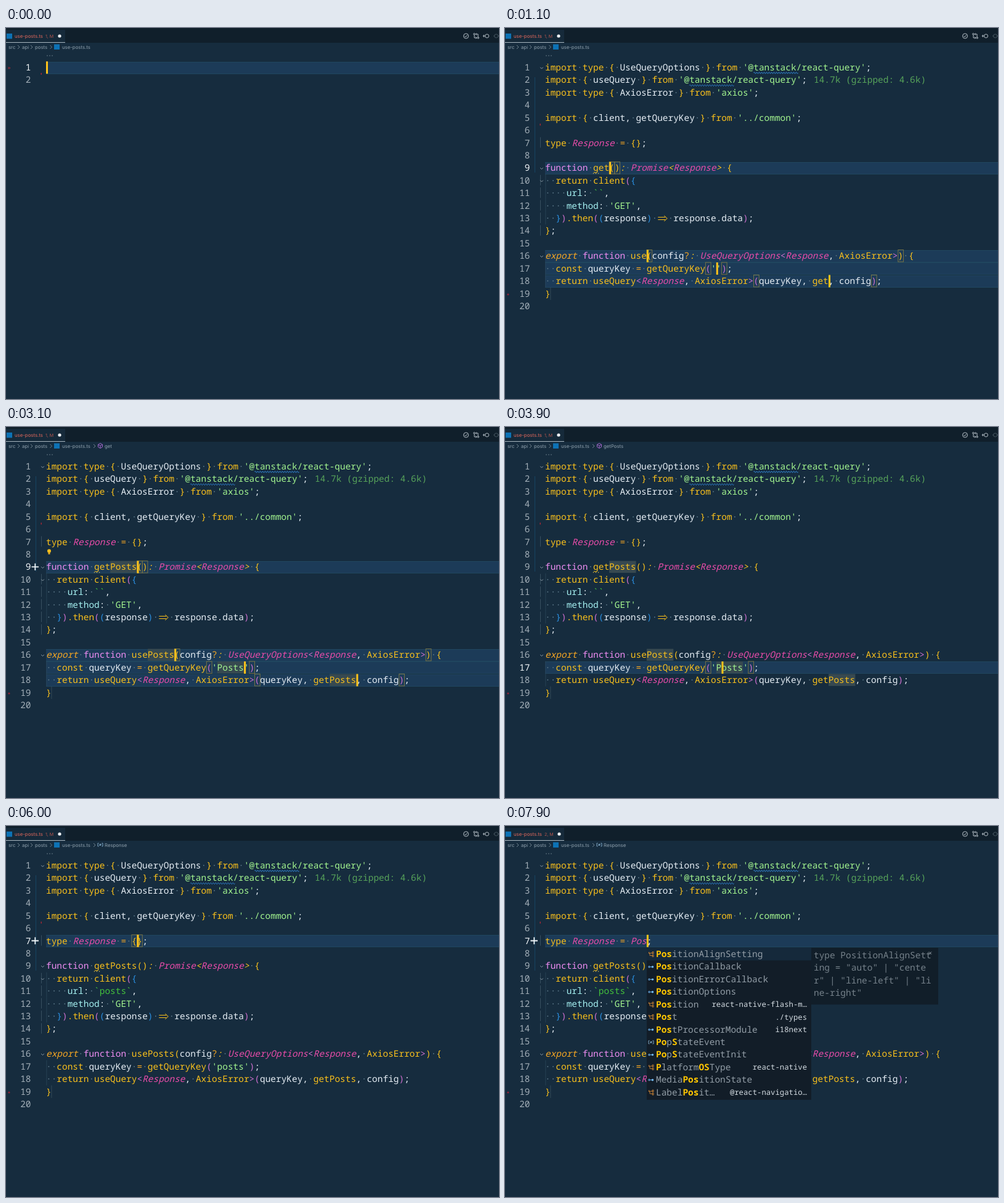
These frames come from a looping animation (800 px wide and 603 px high, 8000 ms). An HTML page:

```html
<!DOCTYPE html>
<html lang="en">
<head>
<meta charset="utf-8">
<title>use-posts.ts</title>
<style>
html, body { margin: 0; width: 100%; height: 100%; overflow: hidden; background: #162c3e; }
svg { display: block; width: 100%; height: 100%; text-rendering: geometricPrecision; }
.code { font: 14.467px "Noto Sans Mono", "DejaVu Sans Mono", monospace; }
.small { font-size: 12.28px; }
.ui { font: 7.8px Inter, Roboto, sans-serif; fill: #8fa0ad; }
.k { fill: #f9c01c; }
.o { fill: #f5a623; }
.x { fill: #f5a623; font-style: italic; }
.e { fill: #f9c01c; font-style: italic; }
.f { fill: #ee8df2; }
.p { fill: #e94ca9; font-style: italic; }
.w { fill: #e6eef5; }
.s { fill: #a3f58f; }
.u { fill: #43c03c; }
.c { fill: #a4eff0; }
.m { fill: #d070d0; }
.b { fill: #2b8fe0; }
.g { fill: #7d774a; font-style: italic; }
.n { fill: #57a35a; }
.dots { fill: #5a7586; }
.num { fill: #a3afb8; text-anchor: end; }
.hit { fill: #ffc600; font-weight: 800; }
.line { fill: none; stroke-width: 1; }
.end { text-anchor: end; }
</style>
</head>
<body>
<svg id="stage" viewBox="0 0 800 603" preserveAspectRatio="none"></svg>
<script>
const LEFT = 65, CHAR = 8.68, ROW = 20.42, LOOP = 8000;
const stage = document.getElementById('stage');

// Popup labels carry their matched letters in brackets: icon, label, detail.
const useList = {
  rows: [
    ['v', '[use]', 'i18next'], ['s', '[use]iq', 'useInfiniteQuery'], ['s', '[use]m', 'useMutation'],
    ['s', '[use]q', 'useQuery without para…'], ['s', '[use]qp', 'useQuery with params'],
    ['c', '[use]AddPost', './use-add-post'], ['c', '[use]AnimatedGestureHa…', 'react…'],
    ['c', '[use]AnimatedKeybo…', 'react-nati…'], ['c', '[use]AnimatedPro…', 'react-native…'],
    ['c', '[use]AnimatedReact…', 'react-nati…'], ['c', '[use]AnimatedR…', 'react-native-r…'],
    ['c', '[use]AnimatedScrollHa…', 'react-…']
  ],
  doc: ['Add import from "i18n…', '', 'const use: <T extends…']
};
const queryList = {
  rows: [['s', '[useq]', 'useQuery without para…'], ['s', '[useq]p', 'useQuery with params']],
  doc: []
};
const posList = {
  rows: [
    ['t', '[Pos]itionAlignSetting', ''], ['i', '[Pos]itionCallback', ''], ['i', '[Pos]itionErrorCallback', ''],
    ['i', '[Pos]itionOptions', ''], ['t', '[Pos]ition', 'react-native-flash-m…'], ['t', '[Pos]t', './types'],
    ['i', '[Pos]tProcessorModule', 'i18next'], ['v', '[Po]p[S]tateEvent', ''], ['i', '[Po]p[S]tateEventInit', ''],
    ['t', '[P]latform[OS]Type', 'react-native'], ['i', 'Media[Pos]itionState', ''],
    ['t', 'Label[Pos]it…', '@react-navigatio…']
  ],
  doc: ['type PositionAlignSett', 'ing = "auto" | "cente', 'r" | "line-left" | "li', 'ne-right"']
};

// Each step changes part of the state from its time on.
const steps = [
  [0, { typed: '', full: false, shift: 0, at: [1, 0], problems: 1, crumb: '', name: '', key: '', url: '', type: '~k{}', slots: false, plus: 0, bulb: false, popup: null }],
  [300, { typed: 'u', shift: -17, at: [1, 1] }],
  [400, { typed: 'us', at: [1, 2] }],
  [500, { typed: 'use', at: [1, 3], popup: useList }],
  [800, { typed: 'useq', at: [1, 4], popup: queryList }],
  [1100, { full: true, shift: 0, at: 'name', slots: true, popup: null }],
  [1400, { problems: 2, crumb: 'get' }],
  [2200, { name: 'P', key: 'P' }],
  [2300, { name: 'Po', key: 'Po' }],
  [2400, { name: 'Pos', key: 'Pos' }],
  [2500, { name: 'Post', key: 'Post' }],
  [2600, { name: 'Posts', key: 'Posts' }],
  [2800, { problems: 1, bulb: true, plus: 9 }],
  [3300, { crumb: 'getPosts' }],
  [3600, { at: [17, 33], bulb: false, plus: 0 }],
  [4000, { key: 'osts', at: [17, 32] }],
  [4100, { key: 'posts', at: [17, 33] }],
  [4600, { at: [11, 10], crumb: 'getPosts/url' }],
  [4900, { url: 'p', at: [11, 11] }],
  [5000, { url: 'po', at: [11, 12] }],
  [5100, { url: 'pos', at: [11, 13] }],
  [5200, { url: 'post', at: [11, 14] }],
  [5300, { url: 'posts', at: [11, 15] }],
  [6000, { at: [7, 17], slots: false, crumb: 'Response', plus: 7 }],
  [7000, { type: '~g}', at: [7, 16] }],
  [7100, { type: '' }],
  [7400, { type: '~pP', at: [7, 17] }],
  [7500, { type: '~pPo', at: [7, 18], problems: 2 }],
  [7600, { type: '~pPos', at: [7, 19], popup: posList }]
];

// A tilde and a class letter open each coloured run.
const source = s => s.full ? [
  "~kimport type { ~wUseQueryOptions~k } from ~s'@tanstack/react-query'~w;",
  "~kimport { ~wuseQuery~k } from ~s'@tanstack/react-query'~w;",
  "~kimport type { ~wAxiosError~k } from ~s'axios'~w;",
  '',
  "~kimport { ~wclient, getQueryKey~k } from ~s'../common'~w;",
  '',
  `~ktype ~pResponse ~o= ${s.type}~w;`,
  '',
  `~ffunction ~kget${s.name}()~e: ~pPromise~e<~pResponse~e> ~k{`,
  '~k  return client~m(~b{',
  `~c    url~w: ~u\`${s.url}\`~w,`,
  "~c    method~w: ~s'GET'~w,",
  '~b  }~m)~k.then~m(~b(~wresponse~b) ~k   ~wresponse.data~m)~w;',
  '~k}~w;',
  '',
  `~xexport ~ffunction ~kuse${s.name}(~wconfig~o?~e: ~pUseQueryOptions~m<~pResponse~w, ~kAxiosError~m>~k) {`,
  `~k  const ~wqueryKey ~o= ~kgetQueryKey~m(~s'${s.key}'~m)~w;`,
  `~k  return useQuery~m<~pResponse~w, ~kAxiosError~m>(~wqueryKey, ~kget${s.name}~w, config~m)~w;`,
  '~k}',
  ''
] : ['~w' + s.typed, ''];

const esc = text => text.replace(/&/g, '&amp;').replace(/</g, '&lt;').replace(/ /g, '\u00a0');
const text = (x, y, cls, str) => `<text x="${x}" y="${y}" class="${cls}">${esc(str)}</text>`;
const rect = (x, y, w, h, fill, more = '') => `<rect x="${x}" y="${y}" width="${w}" height="${h}" fill="${fill}" ${more}/>`;
const path = (d, stroke, x = 0, y = 0) => `<path class="line" d="${d}" stroke="${stroke}" transform="translate(${x} ${y})"/>`;
const circle = (x, y, r, fill) => `<circle cx="${x}" cy="${y}" r="${r}" fill="${fill}"/>`;
const ring = (x, y, r, stroke) => `<circle class="line" cx="${x}" cy="${y}" r="${r}" stroke="${stroke}"/>`;
const colX = col => LEFT + col * CHAR;

function icon(kind, x, y) {
  const shapes = {
    v: () => path('M-2.5 -2.5H-4V2.5H-2.5M2.5 -2.5H4V2.5H2.5M-1.3 1.3L1.3 -1.3', '#7fa6c4', x, y) + ring(x, y, 1.2, '#7fa6c4'),
    s: () => path('M-3.5 -3.5H4.5V4.5H-3.5Z', '#98a3ab', x, y),
    c: () => path('M0 -4L3.5 -2V2L0 4L-3.5 2V-2ZM-3.5 -2L0 0L3.5 -2M0 0V4', '#a065c8', x, y),
    i: () => path('M-1.5 0H1', '#75beff', x, y) + ring(x - 3, y, 1.2, '#75beff') + circle(x + 2.5, y, 1.7, '#75beff'),
    t: () => path('M-4 -2H3M-2 -2V2H3M-3 -4L-4 -2L-2 -1M2 -4H4V-1H2ZM2 1H4V4H2Z', '#b97a35', x, y),
    w: () => path('M-3.5 3.5L1 -1M0 -2A2.5 2.5 0 0 1 3 -4L2 -2L4 -3A2.5 2.5 0 0 1 1 0', '#9fadb8', x, y)
  };
  return shapes[kind]();
}

function header(s) {
  const chevron = x => path('M-1.5 -3L1.5 0L-1.5 3', '#71838f', x, 31);
  let out = rect(0, 0, 800, 24, '#101f2b') + rect(0, 3, 96, 21, '#162a3a') + rect(0, 23, 96, 1, '#a9b6bf') +
    rect(1, 9, 9, 8.5, '#0d72b5') +
    `<text x="14" y="16" class="ui" style="fill:#e0685c">use-posts.ts</text>` +
    `<text x="64" y="16" class="ui" style="fill:#b5564f;font-size:7px">${s.problems}, M</text>` +
    circle(s.problems > 1 ? 88 : 87, 13, 2.6, '#f4f7fa');
  const tool = '#b4bec6';
  out += ring(746.5, 13, 4, tool) + path('M-2 0L-.5 1.7L2 -1.5', tool, 746.5, 13) +
    path('M-3 -2V3H1M3 2V-3H-1M-.5 1.5L1 3L-.5 4.5M.5 -4.5L-1 -3L.5 -1.5', tool, 763, 13) +
    ring(759.8, 9.8, 1.2, tool) + ring(766.2, 16, 1.2, tool) +
    ring(780.5, 13, 3, tool) + path('M2 0H-2M0 -2L-2 0L0 2', tool, 776, 13) +
    ring(795.5, 13, 3, '#44545f') + path('M-4 0H-2M3 0H5', '#44545f', 795, 13);
  out += text(4, 33.5, 'ui', 'src') + chevron(20.5) + text(26, 33.5, 'ui', 'api') + chevron(41.5) +
    text(47, 33.5, 'ui', 'posts') + chevron(73) + rect(78, 26.5, 9, 8.5, '#0d72b5') + text(91, 33.5, 'ui', 'use-posts.ts');
  if (s.crumb) {
    const [first, second] = s.crumb.split('/');
    out += chevron(143.5) + icon(first === 'Response' ? 'v' : 'c', 153, 30.5) + text(160, 33.5, 'ui', first);
    if (second) out += chevron(198) + icon('w', 208, 30.5) + text(214, 33.5, 'ui', second);
  }
  return out;
}

function popup(list, x, y) {
  const height = list.rows.length * ROW + 2;
  let out = rect(x, y, 267, height, '#121d28') + rect(x, y, 267, ROW, '#15293b');
  list.rows.forEach(([kind, label, detail], i) => {
    const mid = y + 10 + i * ROW;
    const runs = label.split(/[[\]]/).map((run, j) => `<tspan class="${j % 2 ? 'hit' : ''}">${run}</tspan>`).join('');
    out += icon(kind, x + 7, mid + .5) + `<text x="${x + 15}" y="${mid + 5}" class="code" fill="#929da6">${runs}</text>` +
      `<text x="${x + 260}" y="${mid + 4.5}" class="code small end" fill="${i ? '#d3dbe1' : '#78858f'}">${detail}</text>`;
  });
  if (list.doc.length) {
    out += rect(x + 267, y, 206, list.doc.length * ROW + 10.5, '#111e29');
    list.doc.forEach((line, i) => {
      out += `<text x="${x + 271}" y="${y + 17 + i * ROW}" class="code" fill="#75818a">${esc(line)}</text>`;
    });
    out += path('M-2 -2L2 2M2 -2L-2 2', '#98a3ab', x + 460, y + 8.5);
  }
  return out;
}

function wave(row, col, count, y) {
  let d = `M${colX(col)} ${y(row) + 9}`;
  for (let i = 0; i < count * CHAR / 4; i++) d += 'q1 -2.6 2 0t2 0';
  return path(d, '#2f83d6');
}

function editor(s) {
  const lines = source(s), plain = lines.map(line => line.replace(/~\w/g, ''));
  const mid = row => 64 + (row - 1) * ROW + s.shift;
  const n = s.name.length, multi = s.at === 'name';
  const cursors = multi ? [[9, 12 + n], [16, 19 + n], [17, 32 + s.key.length], [18, 53 + n]] : [s.at];
  const cell = (row, col, len, fill, more) => rect(colX(col), mid(row) - 9.7, len * CHAR, ROW - 1, fill, more);
  const box = (row, sign) => cell(row, plain[row - 1].indexOf(sign), 1, 'none', 'stroke="#777346" stroke-width="1"');
  let out = '';

  for (const [row] of cursors) {
    const top = Math.round(mid(row) - 9.5);
    out += rect(LEFT, top, 735, 20, '#1c3b58') + path(`M${LEFT} ${top + .5}H800m-735 19H800`, '#20465f');
  }
  if (s.slots) {
    for (const [row, col, len] of [[9, 12, n], [16, 19, n], [17, 32, s.key.length], [18, 53, n], [11, 10, s.url.length]]) {
      out += cell(row, col, len, '#374950');
    }
  }

  if (!s.shift) out += circle(67, 45, .7, '#8496a2') + circle(71, 45, .7, '#8496a2') + circle(75, 45, .7, '#8496a2');
  if (s.full) {
    out += rect(48, 80, 1, 155, '#174463') + rect(56.5, 155.5, 1.5, 3, '#a42736') + circle(5, 433, 1.6, '#8d2238');
    for (const row of [7, 10, 11, 12, 13, 14]) out += rect(57, mid(row) - 9, 1, 17, '#385061');
    for (const row of [10, 11, 12, 13, 17, 18]) out += rect(65.5, mid(row) - 10, .8, ROW, '#2b475a');
    out += rect(73.5, mid(19) - 10, .8, ROW, '#38525f');
    for (const row of [1, 9, 10, 16]) out += path('M-2.3 -1.2L0 1.2L2.3 -1.2', '#8c9ba6', 59.5, mid(row) + 1);
    out += wave(1, 39, 8, mid) + wave(2, 27, 8, mid);
    for (const x of [143.5, 147.5, 151.5]) out += circle(x, mid(9) + 9, .8, '#c5ad55');
    if (s.at[0] === 11) out += rect(82.5, mid(11) - 10, .8, ROW * 2, '#57707d');
    out += text(501, mid(2) + 5, 'code n', '14.7k (gzipped: 4.6k)');
    out += path('M1 -2H13M1 2H13M11 -4.5L16 0L11 4.5', '#f9c01c', colX(21), mid(13) + .5);
  } else {
    out += path('M-2 -1.5L0 0L-2 1.5M0 -1.5L2 0L0 1.5', '#a42736', 5, mid(1) + 1);
    out += s.shift ? rect(57, 38, 1, 18, '#385061') : rect(56.5, 73, 1.5, 3, '#a42736');
  }

  lines.forEach((line, i) => {
    const y = mid(i + 1) + 5, active = cursors[0][0] === i + 1;
    out += `<text x="40.5" y="${y}" class="code num" ${active ? 'style="fill:#f2f6f9"' : ''}>${i + 1}</text>`;
    if (!line) return;
    const runs = line.split('~').slice(1).map(run => `<tspan class="${run[0]}">${esc(run.slice(1))}</tspan>`).join('');
    // Visible whitespace, leaving room for the wide arrow.
    const dots = plain[i].replace(/ {4}(?=response)/, ' xx ').replace(/./g, c => c === ' ' ? '·' : ' ');
    out += text(LEFT, y, 'code dots', dots) + `<text x="${LEFT}" y="${y}" class="code">${runs}</text>`;
  });

  if (multi) for (const row of [9, 16, 17, 18]) out += box(row, '(') + box(row, ')');
  else if (s.at[0] === 11) out += box(10, '{') + box(13, '}');
  else if (s.at[0] === 17) out += box(17, '(') + box(17, ')');
  else if (s.type === '~k{}' && s.full) out += box(7, '{') + box(7, '}');

  for (const [row, col] of cursors) out += rect(colX(col), mid(row) - 9.7, 3, 20, '#ffc41a');
  if (s.bulb) out += circle(70, 201.5, 3, '#f5bd1c') + rect(68.5, 204, 3, 3, '#d9a520');
  if (s.plus) out += `<path d="M41.5 ${mid(s.plus)}h11.5m-5.7 -5.7v11.4" stroke="#eef3f6" stroke-width="1.8"/>`;
  if (s.popup) out += popup(s.popup, Math.round(colX(s.at[1])), Math.round(mid(s.at[0]) + 11));
  return out;
}

let shown = -1;
function draw() {
  const time = performance.now() % LOOP;
  const current = steps.filter(([start]) => start <= time);
  if (current.length !== shown) {
    shown = current.length;
    const state = Object.assign({}, ...current.map(step => step[1]));
    stage.innerHTML = rect(0, 0, 800, 603, '#162c3e') + header(state) + editor(state);
  }
  requestAnimationFrame(draw);
}
draw();
</script>
</body>
</html>
```
